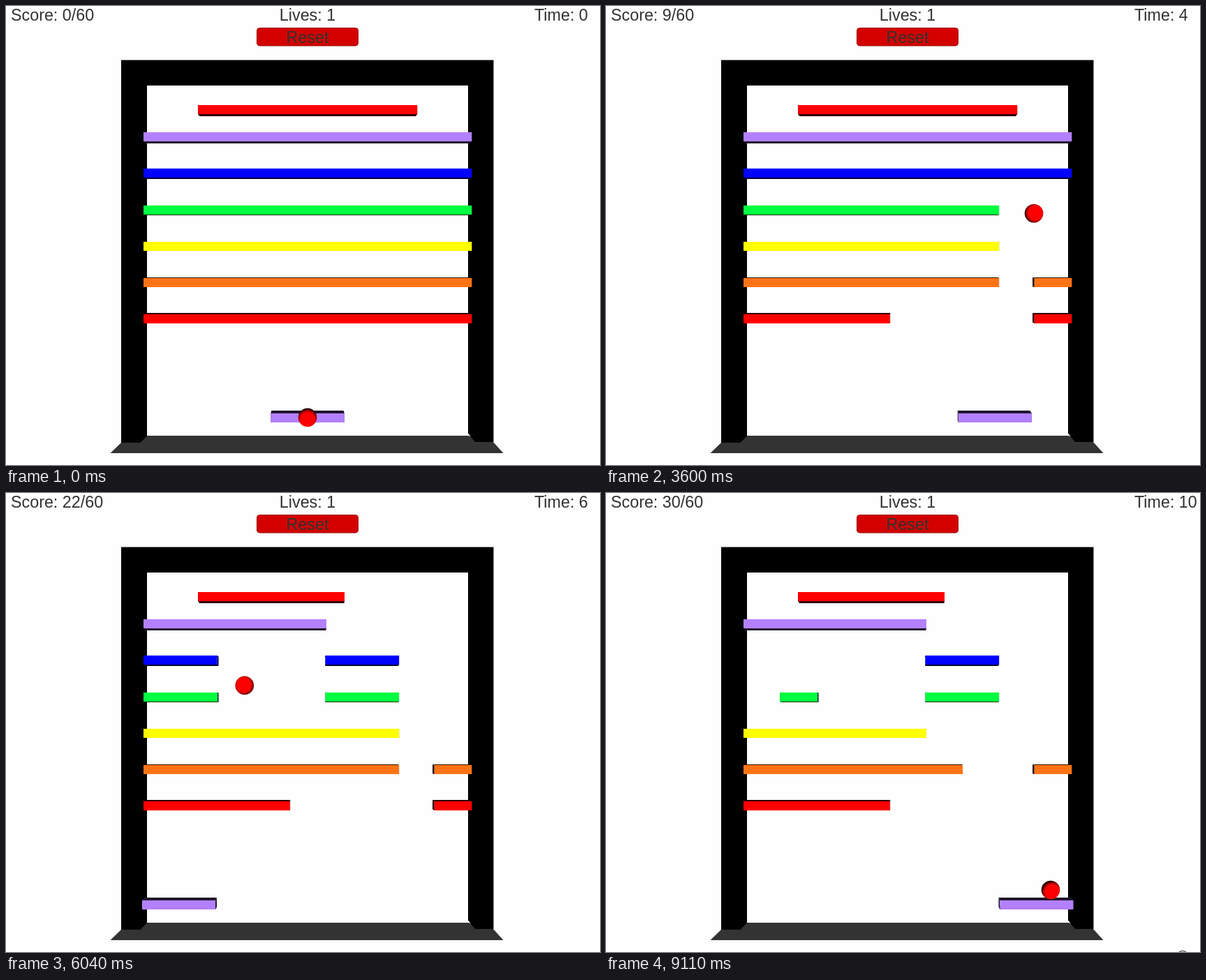
These frames come from a looping animation (851 by 658 pixels, 9.21 s). An HTML page with a canvas:

```html
<!DOCTYPE html>
<html lang="en">
<head>
<meta charset="utf-8">
<title>Brick game</title>
<style>
html, body { margin: 0; width: 100%; height: 100%; overflow: hidden; background: #fff; }
canvas { display: block; }
</style>
</head>
<body>
<canvas id="stage" width="851" height="658"></canvas>
<script>
const ctx = document.getElementById('stage').getContext('2d');
const LOOP = 9210;
const EYE = { x: 432, y: 344 };
const DEPTH = 0.985; // scale of a block's back face about the eye point

const RED = [255, 0, 0];
const PURPLE = [179, 128, 255];
const ROW_COLORS = [RED, PURPLE, [0, 0, 255], [0, 255, 64], [255, 255, 0], [255, 115, 20], RED];
const PITCH = 52.1;
const BRICK_W = 53.5;
const BRICK_H = 13;
const BALL_R = 13.3;

// Each leg ends at a time; the ball runs through its corner points at even speed.
const LEGS = [
  { end: 0, path: [[432, 590]] },
  { end: 1290, path: [[451, 456]] },
  { end: 2490, path: [[512, 566], [570, 475]] },
  { end: 4720, path: [[615, 320], [598, 118], [594, 122]] },
  { end: 6040, path: [[510, 178], [465, 218], [410, 228], [408, 278], [355, 258], [342, 276]] },
  { end: 6620, path: [[306, 258], [228, 276], [216, 250]] },
  { end: 7400, path: [[266, 271]] },
  { end: 8500, path: [[312, 273], [454, 323], [510, 332], [545, 385], [643, 466]] },
  { end: 9110, path: [[637, 569]] }
];

// start time and destination of each paddle move
const PADDLE_MOVES = [[1250, 398], [1850, 564.5], [3300, 504.8], [4800, 195], [6900, 256], [7640, 564.5]];
const PADDLE_SPEED = 0.35;

const rgb = (c, k = 1) => `rgb(${c.map(v => Math.round(v * k))})`;

function timePath() {
  const keys = [];
  let t = 0, from = LEGS[0].path[0];
  for (const { end, path } of LEGS) {
    const lengths = path.map((p, i) => {
      const q = i ? path[i - 1] : from;
      return Math.hypot(p[0] - q[0], p[1] - q[1]);
    });
    const total = lengths.reduce((a, b) => a + b) || 1;
    const span = end - t;
    path.forEach(([x, y], i) => {
      t += span * lengths[i] / total;
      keys.push({ t, x, y });
    });
    t = end;
    from = path[path.length - 1];
  }
  return keys;
}

const keys = timePath();

function ballAt(t) {
  const n = keys.findIndex(k => k.t > t);
  if (n < 0) return keys[keys.length - 1];
  const a = keys[n - 1], b = keys[n];
  const f = (t - a.t) / (b.t - a.t);
  return { x: a.x + (b.x - a.x) * f, y: a.y + (b.y - a.y) * f };
}

function paddleAt(t) {
  let x = 379.5;
  for (const [start, goal] of PADDLE_MOVES) {
    const reach = Math.max(0, t - start) * PADDLE_SPEED;
    x += Math.max(-reach, Math.min(reach, goal - x));
  }
  return x;
}

function makeBricks() {
  const bricks = [];
  ROW_COLORS.forEach((color, row) => {
    const y = row ? Math.round(181 + 52.25 * (row - 1)) : 142;
    for (let col = 0; col < (row ? 9 : 6); col++) {
      const x = 197 + (col + (row ? 0 : 1.5)) * PITCH;
      bricks.push({ row, color, x, y, right: x + BRICK_W, hit: Infinity });
    }
  });
  return bricks;
}

const bricks = makeBricks();

// A brick is gone from the first moment the ball touches it.
for (let t = 0; t < LOOP; t += 2) {
  const { x, y } = ballAt(t);
  for (const b of bricks) {
    const touch = x + 8.5 > b.x && x - 8.5 < b.right &&
      y + 12 > b.y && y - 21 < b.y + BRICK_H;
    if (touch) b.hit = Math.min(b.hit, t);
  }
}

function poly(color, ...points) {
  ctx.fillStyle = color;
  ctx.beginPath();
  points.forEach(p => ctx.lineTo(p[0], p[1]));
  ctx.closePath();
  ctx.fill();
}

function block(x1, y1, x2, y2, color) {
  const front = [[x1, y1], [x2, y1], [x2, y2], [x1, y2]];
  const back = front.map(([x, y]) => {
    const by = EYE.y + (y - EYE.y) * DEPTH;
    return [EYE.x + (x - EYE.x) * DEPTH, y < EYE.y ? Math.ceil(by) : Math.floor(by)];
  });
  front.forEach((p, i) => {
    const j = (i + 1) % 4;
    poly(rgb(color, 0.18), p, front[j], back[j], back[i]);
  });
  poly(rgb(color), ...front);
}

function drawFrame() {
  poly('#333', [149.5, 641], [165, 626], [202, 616], [662, 616], [698, 625], [712.5, 641]);
  poly('#000', [165, 77.5], [698.5, 77.5], [698.5, 625], [672, 625], [662, 612.5],
    [662, 114], [202, 114], [202, 616], [192.5, 626], [165, 626]);
}

function drawBricks(t) {
  // merge touching neighbours into runs
  const runs = [];
  for (const b of bricks.filter(b => t < b.hit)) {
    const last = runs[runs.length - 1];
    if (last && last.row === b.row && last.right > b.x) last.right = b.right;
    else runs.push({ ...b });
  }
  runs.forEach(r => block(r.x, r.y, r.right, r.y + BRICK_H, r.color));
}

function drawBall({ x, y }) {
  const lx = x + (x - EYE.x) * 0.012, ly = y + (y - EYE.y) * 0.012;
  const shade = ctx.createRadialGradient(lx, ly, 0, lx, ly, 15);
  shade.addColorStop(0, '#ff0000');
  shade.addColorStop(0.68, '#f80000');
  shade.addColorStop(0.85, '#a00000');
  shade.addColorStop(1, '#280000');
  ctx.fillStyle = shade;
  ctx.beginPath();
  ctx.arc(x, y, BALL_R, 0, Math.PI * 2);
  ctx.fill();
}

function drawHud(t) {
  ctx.fillStyle = '#d40000';
  ctx.strokeStyle = '#9a0000';
  ctx.lineWidth = 1;
  ctx.beginPath();
  ctx.roundRect(359.5, 31.5, 145, 25.5, 4);
  ctx.fill();
  ctx.stroke();

  const score = bricks.filter(b => t >= b.hit + 30).length; // label lags a little
  const seconds = Math.floor(t * 0.00104 + 0.57);
  ctx.font = '23.3px "Liberation Sans", Arial, sans-serif';
  ctx.fillStyle = '#323232';
  ctx.textAlign = 'left';
  ctx.fillText(`Score: ${score}/60`, 7, 20.7);
  ctx.fillText(`Time: ${seconds}`, 757, 20.7);
  ctx.textAlign = 'center';
  ctx.fillText('Lives: 1', 432, 20.7);
  ctx.fillText('Reset', 432, 53);
}

function drawPointer(t) {
  if (t < 8400) return;
  ctx.strokeStyle = '#222';
  ctx.lineWidth = 1.2;
  ctx.beginPath();
  ctx.arc(826, 664.5, 8, 0, Math.PI * 2);
  ctx.stroke();
}

function draw(t) {
  ctx.fillStyle = '#fefefe';
  ctx.fillRect(0, 0, 851, 658);
  drawFrame();
  drawBricks(t);
  const px = paddleAt(t);
  block(px, 584, px + 105, 597, PURPLE);
  drawBall(ballAt(t));
  drawHud(t);
  drawPointer(t);
}

const start = performance.now();
function tick() {
  draw((performance.now() - start) % LOOP);
  requestAnimationFrame(tick);
}
tick();
</script>
</body>
</html>
```
